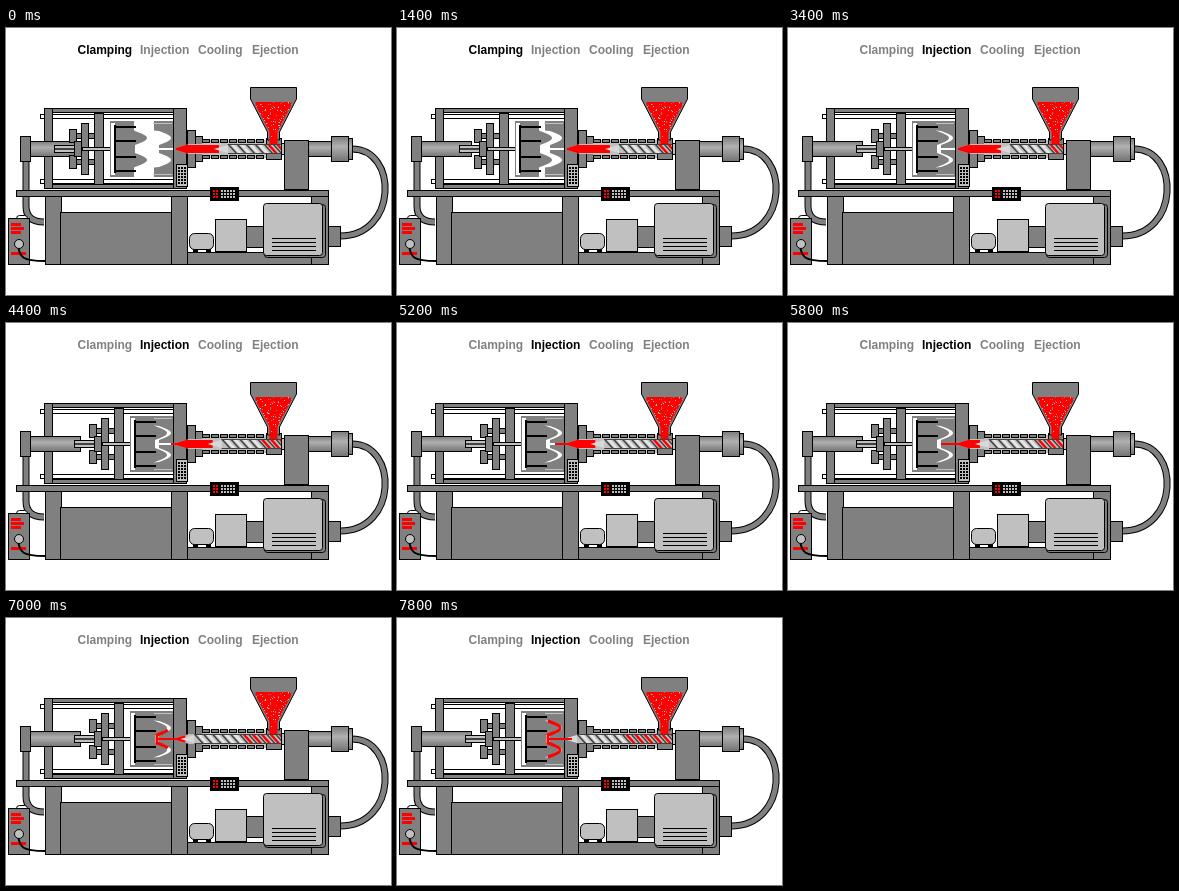
Recreate the animation shown at these times as an HTML page with a canvas. Size 385 px wide and 267 px high, loop 8000 ms.

```html
<!DOCTYPE html>
<html lang="en">
<head>
<meta charset="utf-8">
<title>Injection moulding machine</title>
<style>
html, body { margin: 0; width: 100%; height: 100%; overflow: hidden; background: #fff; }
canvas { display: block; width: 385px; height: 267px; }
</style>
</head>
<body>
<canvas id="stage" width="385" height="267"></canvas>
<script>
const ctx = document.getElementById('stage').getContext('2d');
const GREY = '#808080', LIGHT = '#c0c0c0', DARK = '#404040', RED = '#f00';
const AXIS = 121; // height of the machine's centre line
const clamp = (v, lo, hi) => Math.max(lo, Math.min(hi, v));

function rect(x, y, w, h, fill) {
  ctx.fillStyle = fill;
  ctx.fillRect(x, y, w, h);
}

// Filled box with a one-pixel black outline inside its bounds
function box(x, y, w, h, fill = GREY) {
  rect(x, y, w, h, '#000');
  rect(x + 1, y + 1, w - 2, h - 2, fill);
}

const centred = (x, w, h, fill) => box(x, AXIS - h / 2, w, h, fill);

// The same part above and below the centre line; "offset" is its inner edge
function pair(draw, x, offset, w, h, fill) {
  draw(x, AXIS - offset - h, w, h, fill);
  draw(x, AXIS + offset, w, h, fill);
}

function tube(x, w, h) {
  const shade = ctx.createLinearGradient(0, AXIS - h / 2, 0, AXIS + h / 2);
  shade.addColorStop(0, '#787878');
  shade.addColorStop(0.4, '#b0b0b0');
  shade.addColorStop(1, '#707070');
  centred(x, w, h, shade);
}

function trace(points) {
  ctx.beginPath();
  points.forEach(([x, y]) => ctx.lineTo(x, y));
}

function stroke(color, width) {
  ctx.strokeStyle = color;
  ctx.lineWidth = width;
  ctx.stroke();
}

function fillAndOutline(fill) {
  ctx.fillStyle = fill;
  ctx.fill();
  stroke('#000', 1);
}

function rounded(x, y, w, h, radius, fill) {
  ctx.beginPath();
  ctx.roundRect(x + 0.5, y + 0.5, w - 1, h - 1, radius);
  fillAndOutline(fill);
}

function dots(x, y, columns, rows, pitch, size, fill) {
  for (let i = 0; i < columns * rows; i++)
    rect(x + i % columns * pitch, y + Math.floor(i / columns) * pitch, size, size, fill);
}

function hose(path) {
  const p = new Path2D(path);
  ctx.strokeStyle = '#000';
  ctx.lineWidth = 7;
  ctx.stroke(p);
  ctx.strokeStyle = GREY;
  ctx.lineWidth = 5;
  ctx.stroke(p);
}

// Cavity centre line: x at distance d from the machine axis
const cavityDepth = 18;
const cavityX = d => 151 + 12 * Math.sin(Math.PI * clamp((Math.abs(d) - 4) / 14, 0, 1));

function contour(reach, xAt) {
  const points = [];
  for (let d = -reach; d <= reach; d += 0.5) points.push([xAt(d), AXIS + d]);
  return points;
}

function mouldHalf(backX, gap) {
  const face = contour(28, d => Math.abs(d) <= cavityDepth ? cavityX(d) + gap : 148);
  trace([[backX, AXIS - 28], ...face, [backX, AXIS + 28]]);
  ctx.fillStyle = GREY;
  ctx.fill();
}

function drawTitles(active) {
  ctx.font = 'bold 12px "Liberation Sans", Arial, sans-serif';
  const starts = { Clamping: 71.5, Injection: 134, Cooling: 192, Ejection: 246 };
  Object.entries(starts).forEach(([word, x], i) => {
    ctx.fillStyle = i === active ? '#000' : GREY;
    ctx.fillText(word, x, 26);
  });
}

function drawControlBox() {
  rounded(10, 187, 12, 8, 3, '#fff');
  box(2, 190, 22, 47);
  for (let row = 0; row < 3; row++) rect(5, 195 + row * 4, 10 + row % 2 * 3, 3, RED);
  rect(5, 224, 15, 3, RED);
  ctx.beginPath();
  ctx.moveTo(12, 216);
  ctx.bezierCurveTo(13, 230, 17, 233, 39, 233);
  stroke('#000', 2);
  rounded(8, 211, 10, 10, 5, LIGHT);
}

function drawBase() {
  hose('M20 133V178Q20 194 38 194');
  hose('M346 121C392 121 392 208 334 208');
  box(322, 198, 13, 21);

  for (const x of [39, 165]) box(x, 167, 17, 70);
  box(54, 184, 112, 53);
  box(181, 224, 142, 13);
  box(305, 167, 18, 70);
  box(10, 162, 313, 7);

  box(240, 198, 19, 22);
  box(209, 191, 32, 33, LIGHT);
  for (const x of [187, 200]) rect(x, 221, 5, 3, '#000');
  rounded(183, 205, 25, 17, 5, LIGHT);

  rounded(258, 176, 62, 54, 3, GREY);
  rounded(257, 175, 60, 53, 3, LIGHT);
  for (let y = 210; y < 225; y += 4) rect(266, y, 44, 1, '#000');
  drawControlBox();
}

function drawClamp(shift) {
  box(38, 80, 143, 81, '#fff');
  box(38, 80, 143, 5);
  box(38, 156, 143, 5);
  pair(box, 34, 30, 134, 5, '#fff');
  box(38, 80, 9, 81);
  tube(24, 51, 16);
  centred(14, 11, 26);

  // Piston, toggle and platen travel together
  ctx.save();
  ctx.translate(shift, 0);
  centred(48, 27, 8, LIGHT);
  rect(49, AXIS - 1, 20, 2, DARK);
  pair(box, 63, 10, 26, 6);
  pair(box, 63, 6, 8, 14);
  centred(75, 8, 52);
  centred(68, 8, 16);
  centred(88, 10, 72);
  centred(76, 29, 4, LIGHT);
  ctx.restore();
}

function drawMould(shift) {
  mouldHalf(168, 2);
  pair(rect, 147, 25, 19, 1, LIGHT);
  rect(150, AXIS - 1, 20, 2, '#fff');

  ctx.save();
  ctx.translate(shift - 20, 0);
  mouldHalf(124, -2);
  rect(125, AXIS - 26, 4, 52, '#fff');
  rect(128, AXIS - 24, 2, 48, '#000');
  for (const offset of [7, 21]) pair(rect, 129, offset, 21, 2, '#000');
  ctx.restore();

  box(167, 80, 14, 81);
  box(170, 136, 12, 23, LIGHT);
  dots(172, 139, 3, 6, 3, 2, '#000');
}

function drawInjector() {
  centred(181, 9, 38);
  centred(189, 8, 26);
  rect(196, AXIS - 9, 65, 18, LIGHT);
  for (let x = 196; x < 258; x += 9) pair(box, x, 6, 8, 4);
  centred(260, 16, 22);
  box(278, 112, 25, 50);
  centred(275, 4, 12, LIGHT);
  tube(302, 24, 16);
  tube(325, 18, 26);
  tube(342, 5, 22);
}

function traceFunnel(half, neckHalf, top, shoulder, neck, bottom) {
  const side = [[half, top], [half, shoulder], [neckHalf, neck], [neckHalf, bottom]];
  const middle = 267.5;
  trace([...side.map(([w, y]) => [middle + w, y]), ...side.reverse().map(([w, y]) => [middle - w, y])]);
  ctx.closePath();
}

function drawHopper() {
  traceFunnel(23, 6, 59.5, 71, 104, 112);
  fillAndOutline(GREY);
  ctx.save();
  traceFunnel(18, 4, 74, 77, 104, 118);
  ctx.clip();
  rect(240, 70, 50, 50, RED);
  let seed = 7;
  const random = () => (seed = seed * 16807 % 2147483647) / 2147483647;
  for (let i = 0; i < 150; i++)
    rect(Math.floor(249 + 37 * random()), Math.floor(73 + 42 * random()), 1, 1, i % 2 ? LIGHT : GREY);
  ctx.restore();
}

function drawScrew(step) {
  const tip = 208 - 2.1 * step;
  const meltStart = 262 - 1.9 * step;
  ctx.save();
  trace([[170, 120], [183, 116], [275, 116], [275, 126], [183, 126], [170, 122]]);
  ctx.clip();
  rect(170, 116, 105, 10, LIGHT);
  rect(170, 117, Math.max(0, tip - 165), 8, RED);
  trace([[tip, AXIS], [tip + 14, AXIS - 4], [tip + 14, AXIS + 4]]);
  ctx.fillStyle = '#d8d8d8';
  ctx.fill();
  for (let x = tip + 14; x < 285; x += 9) {
    trace([[x, 116], [x + 9, 126]]);
    stroke(DARK, 1.5);
    trace([[x + 4, 116], [x + 13, 126]]);
    stroke(x + 5 >= meltStart ? RED : '#e8e8e8', 2.5);
  }
  pair(rect, tip + 14, 4, 120, 1, DARK);
  ctx.restore();
}

function drawMelt(step) {
  const front = Math.round(170 - 20 * Math.min(step / 12, 1));
  rect(front, AXIS - 1, 175 - front, 2, RED);
  if (step > 12) {
    trace(contour(cavityDepth * (step - 12) / 8, cavityX));
    stroke(RED, 3);
  }
}

function drawPanel() {
  box(204, 159, 29, 14, '#000');
  dots(207, 162, 2, 3, 3, 2, RED);
  dots(215, 162, 5, 3, 3, 2, LIGHT);
}

function draw(now) {
  const t = now % 8000;
  const closing = clamp(Math.floor((t - 1200) / 200), 0, 7);
  const shift = closing && 13 + closing;
  const step = clamp(Math.floor((t - 3800) / 200), 0, 20);

  rect(0, 0, 385, 267, '#fff');
  drawTitles(t < 3400 ? 0 : 1);
  drawBase();
  drawClamp(shift);
  drawMould(shift);
  drawInjector();
  drawHopper();
  drawScrew(step);
  drawMelt(step);
  drawPanel();
  requestAnimationFrame(draw);
}
requestAnimationFrame(draw);
</script>
</body>
</html>
```
